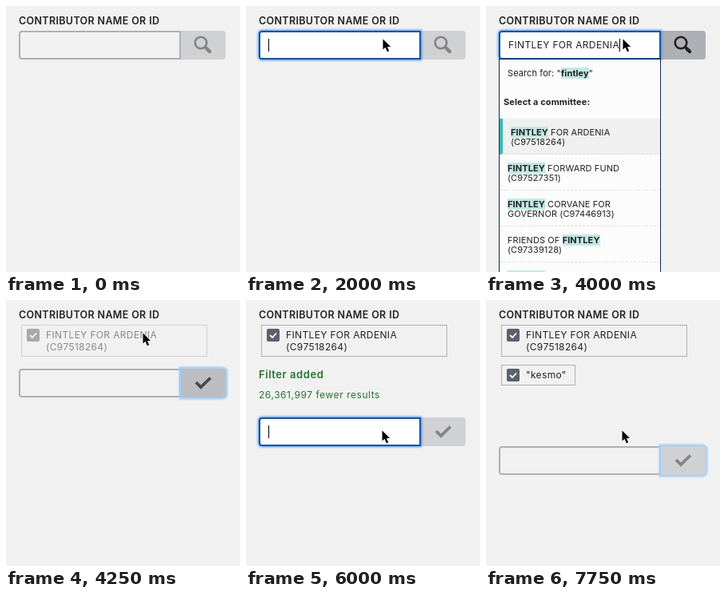
Write an HTML page that moves like this. It is 293x333 px and loops after 8000 ms.

```html
<!DOCTYPE html>
<html lang="en">
<head>
<meta charset="utf-8">
<title>Contributor filter</title>
<style>
html, body { margin: 0; width: 100%; height: 100%; overflow: hidden; background: #f1f1f1; }
#stage { position: relative; width: 293px; height: 333px; overflow: hidden;
  font: 12px Inter, sans-serif; letter-spacing: .35px; color: #212121; white-space: nowrap; }
#stage div, #stage > svg { position: absolute; box-sizing: border-box; }
#stage .label { left: 16px; top: 9px; font-size: 12.5px; font-weight: 600; line-height: 19px; letter-spacing: .35px; }
.field { left: 16px; width: 203px; height: 36px; padding-left: 10px; line-height: 32px;
  border: 2px solid #aeb0b5; border-radius: 4px 0 0 4px; }
.field.focus { background: #fff; border-color: #1c549c; box-shadow: 0 0 3px 1px #3e94f0; }
.caret { display: inline-block; width: 1px; height: 16px; background: #000; vertical-align: -4px; }
.button { left: 219px; width: 56px; height: 36px; border-radius: 0 4px 4px 0; }
.button.focus { box-shadow: 0 0 2px 2.5px #a5cdf8; }
.button svg { display: block; fill: none; }
.drop { left: 16px; width: 203px; border: 1px solid #112e51; background: #fcfcfc;
  font-size: 11px; letter-spacing: .1px; }
#stage .drop div { position: relative; }
.drop b { font-weight: 700; background: #c3e8e5; }
.search { height: 33px; line-height: 34px; padding-left: 10px; }
.head { height: 41px; line-height: 41px; padding-left: 5px; font-weight: 700; }
.loading { color: #112e51; }
.item { height: 45px; line-height: 12px; padding: 11px 0 0 10px; border-bottom: 1px dashed #dcdcdc; }
.drop .on { border-left: 4px solid #3bb8b0; background: #f0f0f0; }
.chip { left: 19px; border: 1px solid #aeb0b5; padding: 4px 7px 0 30px; line-height: 15px; }
.chip svg { position: absolute; left: 6px; top: 4px; }
.message { left: 16px; line-height: 25px; letter-spacing: .55px; color: #28722f; }
.message b { font-size: 13px; font-weight: 600; }
</style>
</head>
<body>
<div id="stage"></div>
<script>
const LOOP = 8000;
const stage = document.getElementById('stage');

const committees = {
  fintley: [
    '<b>FINTLEY</b> FOR ARDENIA<br>(C97518264)',
    '<b>FINTLEY</b> FORWARD FUND<br>(C97527351)',
    '<b>FINTLEY</b> CORVANE FOR<br>GOVERNOR (C97446913)',
    'FRIENDS OF <b>FINTLEY</b><br>(C97339128)',
    '<b>FINTLEY</b> VOTERS FUND<br>(C97264075)'
  ],
  kesmo: [
    '<b>KESMO</b> FOR ARDENIA<br>(C97431295)',
    '<b>KESMO</b> FORWARD FUND<br>(C97494610)'
  ]
};
const chips = [
  { top: 31, width: 233, height: 40, text: 'FINTLEY FOR ARDENIA<br>(C97518264)' },
  { top: 81, width: 93, height: 26, text: '"kesmo"' }
];

// Each step changes only the listed properties of the previous state.
const start = { top: 31, icon: 'search', shade: 0, text: '', query: '', picked: -1, chips: 0, fresh: false, message: 0 };
const steps = [
  [0, {}],
  [1000, { pointer: [229, -6] }],
  [1250, { pointer: [170, 28] }],
  [1500, { pointer: [171, 41] }],
  [2000, { focus: 'field', caret: true }],
  [2500, { text: 'fin', query: 'fin', shade: .6 }],
  [2750, { text: 'fint', query: 'fint', shade: 1 }],
  [3000, { text: 'fintley', query: 'fintley' }],
  [3500, { results: true, caret: false }],
  [4000, { text: 'FINTLEY FOR ARDENIA', picked: 0, caret: true }],
  [4250, { top: 86, text: '', query: '', results: false, picked: -1, caret: false,
           focus: 'button', icon: 'check', chips: 1, fresh: true, shade: .6 }],
  [4500, { fresh: false, shade: 0 }],
  [4750, { top: 147, message: .3, pointer: [171, 47] }],
  [5000, { message: .85, pointer: [171, 119] }],
  [5250, { message: 1, pointer: [171, 161] }],
  [5500, { pointer: [170, 163] }],
  [6000, { focus: 'field', caret: true }],
  [6500, { text: 'k' }],
  [6750, { text: 'kes', query: 'kes', shade: 1 }],
  [7000, { text: 'kesmo', query: 'kesmo', results: true }],
  [7500, { top: 183, text: '', query: '', results: false, caret: false,
           focus: 'button', chips: 2, fresh: true, shade: 0, message: .3 }],
  [7750, { fresh: false, message: 0 }]
];

const box = (cls, style, html) => `<div class="${cls}" style="${style}">${html}</div>`;
const mix = (a, b, k) => `rgb(${a.map((v, i) => Math.round(v + (b[i] - v) * k))})`;

function button(s) {
  const ink = mix([130, 131, 134], [33, 33, 33], s.shade);
  const shape = s.icon === 'search'
    ? '<circle cx="25" cy="15" r="7.3" stroke-width="2.6"/><path d="M30 20l2 2" stroke-width="3"/><path d="M32.5 22.5l3.5 3.5" stroke-width="4.5" stroke-linecap="round"/>'
    : '<path d="M19 17l6 6 12-11.5" stroke-width="3.8"/>';
  return box(`button ${s.focus === 'button' ? 'focus' : ''}`,
    `top:${s.top}px;background:${mix([208, 209, 211], [174, 176, 181], s.shade)}`,
    `<svg width="56" height="36" stroke="${ink}">${shape}</svg>`);
}

function dropdown(s) {
  const on = i => s.picked === i ? ' on' : '';
  let rows = box('search' + on(-1), '', `Search for: "<b>${s.query}</b>"`);
  rows += s.results
    ? box('head', '', 'Select a committee:') +
      committees[s.query].map((html, i) => box('item' + on(i), '', html)).join('')
    : box('head loading', '', 'Loading committees...');
  return box('drop', `top:${s.top + 35}px`, rows);
}

function chip(c, faded) {
  const tick = '<svg width="16" height="16"><rect width="16" height="16" rx="2" fill="#5b616b"/><path d="M4 8l3 3 5-5.5" fill="none" stroke="#fff" stroke-width="1.8"/></svg>';
  return box('chip', `top:${c.top}px;width:${c.width}px;height:${c.height}px;opacity:${faded ? .5 : 1}`, tick + c.text);
}

function draw(s) {
  let html = box('label', '', 'CONTRIBUTOR NAME OR ID');
  chips.slice(0, s.chips).forEach((c, i) => html += chip(c, s.fresh && i === s.chips - 1));
  if (s.message) html += box('message', `top:${s.top - 66}px;opacity:${s.message}`,
    '<b>Filter added</b><br>26,361,997 fewer results');
  const field = box(`field ${s.focus === 'field' ? 'focus' : ''}`, `top:${s.top}px`,
    s.text + (s.caret ? '<span class="caret"></span>' : ''));
  html += s.focus === 'field' ? button(s) + field : field + button(s);
  if (s.query) html += dropdown(s);
  if (s.pointer) html += `<svg width="14" height="20" style="left:${s.pointer[0] - 1}px;top:${s.pointer[1] - 1}px">
    <path d="M1.5 1.5v13l3-2.7 2.3 5.4 2.4-1-2.3-5.2h4.2z" stroke="#fff" stroke-width="1.2" paint-order="stroke"/></svg>`;
  stage.innerHTML = html;
}

let shown = 0;
function tick() {
  const t = performance.now() % LOOP;
  const past = steps.filter(([time]) => time <= t);
  if (past.length !== shown) {
    shown = past.length;
    draw(Object.assign({}, start, ...past.map(step => step[1])));
  }
  requestAnimationFrame(tick);
}
tick();
</script>
</body>
</html>
```
